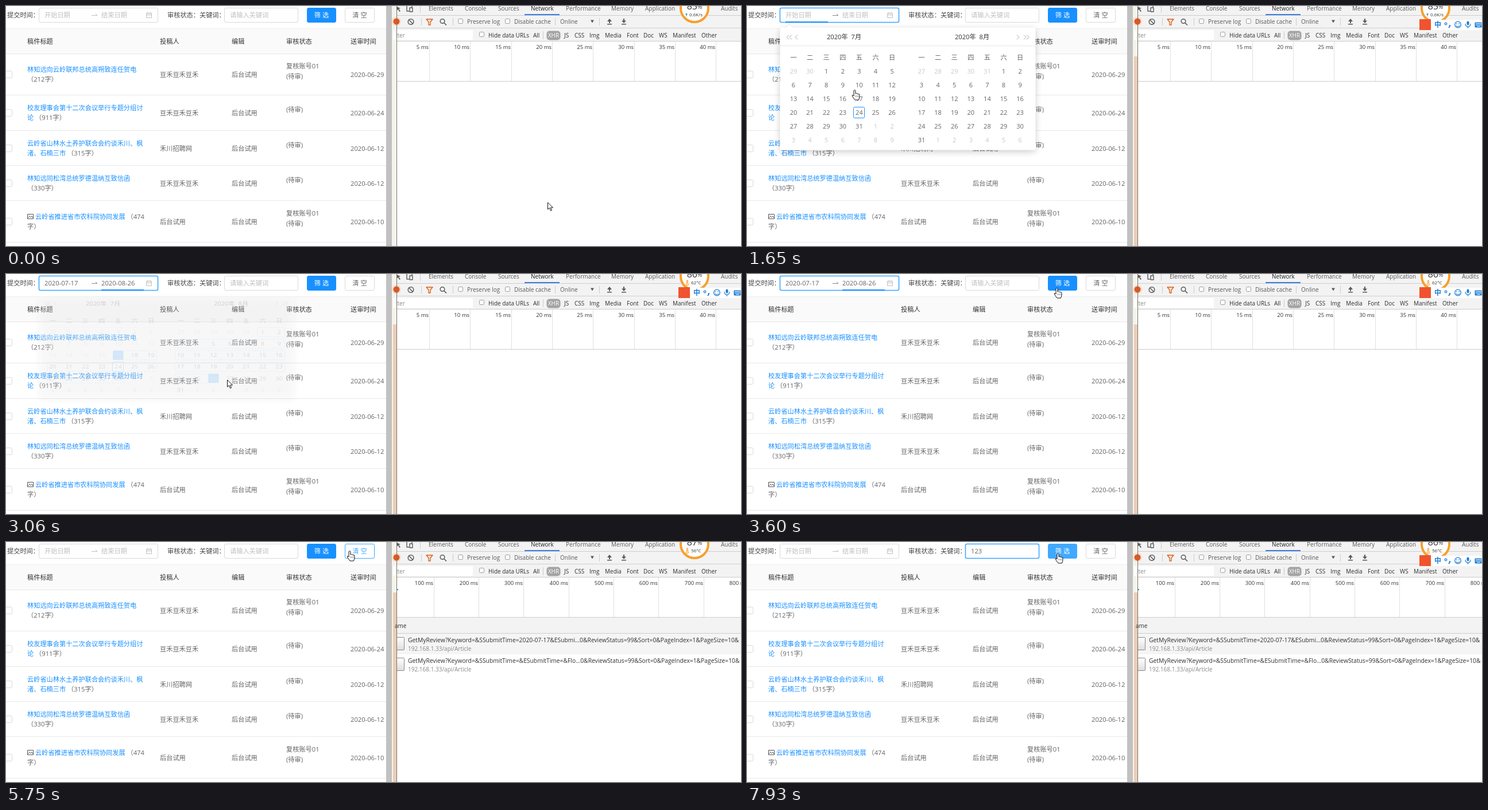
These frames come from a looping animation (1280x419 px, 8000 ms). An HTML page with a canvas:

```html
<!DOCTYPE html>
<html lang="zh-CN">
<head>
<meta charset="utf-8">
<style>
html, body { margin: 0; width: 100%; height: 100%; overflow: hidden; background: #fff; }
canvas { display: block; }
</style>
</head>
<body>
<canvas id="stage" width="1280" height="419"></canvas>
<script>
const c = document.getElementById('stage').getContext('2d');
const FONT = '"Open Sans","Noto Sans CJK SC","Noto Sans CJK JP",sans-serif';
// Sets colons and brackets in the middle of their square
const CENTRED = '"Open Sans","Noto Sans CJK TC","Noto Sans CJK SC",sans-serif';
const BLUE = '#1890ff', LIGHT = '#40a9ff', GREY = '#646464', PALE = '#bfbfbf', DARK = '#303030';
const LOOP = 8000;

// Moments at which the page reacts
const OPEN = 769, PICK = 1970, CLOSE = 2900, SEARCH = 3760, EMPTY = 3900,
      CLEAR = 5580, RELOAD = 5650, FOCUS = 6210;

// Pointer path: time, x, y of the hot spot
const PATH = [
  [0, 943, 343], [70, 943, 343], [680, 120, 16], [870, 120, 16], [948, 143, 37], [1030, 143, 37],
  [1720, 194, 162], [1990, 194, 162], [2095, 347, 197], [2190, 347, 197], [2570, 372, 199],
  [2640, 371, 200], [2720, 364, 207], [2960, 364, 207], [3575, 539, 24], [4750, 539, 24],
  [4820, 496, 13], [4920, 496, 13], [5500, 598, 15], [5780, 598, 15], [6060, 500, 17],
  [6210, 500, 17], [6440, 470, 16], [7380, 470, 16], [7850, 541, 19], [8000, 541, 19]
];

const ROWS = [
  { y: 119, top: 83, title: [['林知远向云岭联邦总统高朔致连任贺电', ''], ['', '（212字）']], author: '豆禾豆禾豆禾', date: '29', by: 1 },
  { y: 186, top: 155, title: [['校友理事会第十二次会议举行专题分组讨', ''], ['论', ' （911字）']], author: '豆禾豆禾豆禾', date: '24' },
  { y: 248, top: 217, title: [['云岭省山林水土养护联合会约谈禾川、枫', ''], ['渚、石楠三市', ' （315字）']], author: '禾川招聘网', date: '12' },
  { y: 309, top: 278, title: [['林知远同松湾总统罗德温纳互致信函', ''], ['', '（330字）']], author: '豆禾豆禾豆禾', date: '12' },
  { y: 376, top: 339, title: [['云岭省推进省市农科院协同发展', ' （474'], ['', '字）']], author: '后台试用', date: '10', by: 1, icon: 1 }
];

const clamp = v => Math.max(0, Math.min(1, v));
const mix = (a, b, k) => a + (b - a) * clamp(k);
const within = (t, a, b) => t >= a && t < b;

// y is the middle of the capitals
function text(s, x, y, color = GREY, size = 11.2, align = 'left', weight = 400, family = FONT) {
  c.font = `${weight} ${size}px ${family}`;
  c.textAlign = align;
  c.textBaseline = 'alphabetic';
  c.fillStyle = color;
  c.fillText(s, x, y + size * .37);
  return c.measureText(s).width;
}
function note(s, x, y, color) { return text(s, x, y, color, 11.2, 'left', 400, CENTRED); }
function rect(x, y, w, h, color) { c.fillStyle = color; c.fillRect(x, y, w, h); }
function box(x, y, w, h, r, fill, stroke, width = 1) {
  c.beginPath();
  c.roundRect(x + .5, y + .5, w - 1, h - 1, r);
  if (fill) { c.fillStyle = fill; c.fill(); }
  if (stroke) { c.strokeStyle = stroke; c.lineWidth = width; c.stroke(); }
}
function icon(d, x, y, stroke, fill, width = 1) {
  const p = new Path2D(d);
  c.save();
  c.translate(x, y);
  if (fill) { c.fillStyle = fill; c.fill(p); }
  if (stroke) { c.strokeStyle = stroke; c.lineWidth = width; c.lineJoin = 'round'; c.stroke(p); }
  c.restore();
}
function disc(x, y, r, fill, stroke, width = 1) {
  c.beginPath();
  c.arc(x, y, r, 0, 7);
  if (fill) { c.fillStyle = fill; c.fill(); }
  if (stroke) { c.strokeStyle = stroke; c.lineWidth = width; c.stroke(); }
}
function field(x, w, focused) {
  if (focused) box(x - 1, 2, w + 2, 28, 3, '#d6ecff');
  box(x, 3, w, 26, 2.5, '#fff', focused ? LIGHT : '#d9d9d9', focused ? 1.5 : 1);
}
function caret(x, t, since) {
  if ((t - since) % 1060 < 530) rect(x, 9, 1, 15, '#333');
}

function pointerAt(t) {
  const q = t < 70 ? 0 : 70 + Math.floor((t - 70) / 78) * 78;
  let i = 1;
  while (i < PATH.length - 1 && PATH[i][0] < q) i++;
  const [ta, xa, ya] = PATH[i - 1], [tb, xb, yb] = PATH[i], k = (q - ta) / (tb - ta);
  return { x: Math.round(mix(xa, xb, k)), y: Math.round(mix(ya, yb, k)) };
}

function drawFilters(t, mouse) {
  note('提交时间：', 2, 16, '#444');
  const dateFocus = within(t, 690, SEARCH);
  const start = within(t, PICK, CLEAR + 40), end = within(t, CLOSE, CLEAR + 40);
  field(57, 208, dateFocus);
  text(start ? '2020-07-17' : '开始日期', 67, 16, start ? GREY : PALE);
  text(end ? '2020-08-26' : '结束日期', 166, 16, end ? GREY : PALE);
  icon('M0 2.5H10M7 0L10 2.5', 149, 14, dateFocus ? '#888' : PALE);
  icon('M.5 1.5H9.5V9.5H.5ZM.5 4.5H9.5M3 0V3M7 0V3', 244, 11, PALE);
  if (within(t, OPEN, SEARCH)) rect(barX(t), 27, 74, 2, BLUE);
  if (within(t, OPEN, PICK)) caret(67, t, OPEN);
  if (within(t, PICK, CLOSE)) caret(166, t, PICK);

  note('审核状态：关键词：', 281, 16, '#444');
  field(380, 129, t >= FOCUS);
  const typed = '123'.slice(0, [6910, 7060, 7210].filter(k => t >= k).length);
  const w = text(typed || '请输入关键词', 390, 16, typed ? GREY : PALE);
  if (t >= FOCUS) caret(typed ? 390 + Math.round(w) : 390, t, t >= 7210 ? 7210 : t >= 6910 ? 6910 : FOCUS);

  const lit = within(t, 3620, CLEAR) || t > 7850;
  box(524, 3, 51, 26, 2.5, lit ? LIGHT : BLUE, lit ? LIGHT : BLUE);
  text('筛 选', 549.5, 16, '#fff', 11.2, 'center', 500);
  const hot = within(t, 5480, 6300) || (mouse.x > 590 && mouse.x < 642 && mouse.y < 30);
  box(590, 3, 52, 26, 2.5, '#fff', hot ? LIGHT : '#d9d9d9');
  text('清 空', 616, 16, hot ? LIGHT : GREY, 11.2, 'center');
}

function drawTable(empty) {
  rect(0, 39, 662, 45, '#fafafa');
  rect(0, 39, 662, 1, '#eee');
  rect(0, 83, 662, 1, '#e8e8e8');
  const cols = empty ? [37, 268, 389, 486, 629] : [37, 268, 393, 488, 600];
  ['稿件标题', '投稿人', '编辑', '审核状态', '送审时间'].forEach((s, i) => text(s, cols[i], 61.5, '#333', 11.2));
  if (empty) {
    rect(0, 216, 662, 203, '#f0f2f5');
    c.beginPath();
    c.ellipse(373.5, 148, 24, 5, 0, 0, 7);
    c.fillStyle = '#f3f3f3';
    c.fill();
    icon('M0 13L8 0H29L37 13V28H0ZM0 13H10C11 13 11 19 14 19H23C26 19 26 13 27 13H37', 355, 122.5, '#d9d9d9', '#fafafa');
    text('暂无数据', 373, 169, '#c4c4c4', 11.2, 'center');
    return;
  }
  for (const r of ROWS) {
    rect(0, r.top, 662, 1, '#e8e8e8');
    box(-2, r.y - 6, 13, 13, 2, '#fff', '#d9d9d9');
    r.title.forEach(([link, count], i) => {
      const y = r.y - 8.5 + i * 17.7;
      let x = 37;
      if (r.icon && !i) {
        icon('M.5 .5H10.5V8.5H.5ZM1 7L4 4L6 6L8 4L10 7M3 2V3', 37, y - 4.5, '#555');
        x = 51;
      }
      if (link) x += text(link, x, y, BLUE);
      note(count, x, y);
    });
    text(r.author, 268, r.y + .5);
    text('后台试用', 393, r.y + .5);
    if (r.by) text('复核账号01', 488, r.y - 14);
    text('(待审)', 488, r.y + (r.by ? 3.5 : -5));
    text('2020-06-' + r.date, 600, r.y + .5);
  }
  rect(0, 412, 662, 1, '#e8e8e8');
}

// Calendar
const MONTHS = [{ x: 81, lead: 2, days: 31, before: 30, first: 0 }, { x: 304, lead: 5, days: 31, before: 31, first: 31 }];
const STEP = 28.6, ROW = 24;

function barX(t) {
  return t < PICK ? mix(166, 67, (t - OPEN) / 300) : mix(67, 166, (t - PICK) / 300);
}
function dayUnder({ x, y }) {
  const m = MONTHS[x < 285 ? 0 : 1];
  const col = Math.round((x - m.x) / STEP), row = Math.round((y - 114) / ROW);
  if (col < 0 || col > 6 || row < 0 || row > 5) return 0;
  const day = row * 7 + col - m.lead + 1;
  return day < 1 || day > m.days ? 0 : m.first + day;
}
function drawCalendar(t, mouse) {
  const p = Math.min(clamp((t - OPEN) / 200), clamp((CLOSE + 200 - t) / 200));
  if (!p) return;
  c.save();
  c.globalAlpha = p;
  c.translate(0, 37 * (1 - (.8 + .2 * p)));
  c.scale(1, .8 + .2 * p);
  c.shadowColor = 'rgba(0,0,0,.2)';
  c.shadowBlur = 12;
  c.shadowOffsetY = 3;
  box(57, 37, 446, 215, 3, '#fff');
  c.shadowColor = 'transparent';
  const notch = barX(t) + 7;
  icon('M-7 7L0 0L7 7', notch, 31, '#e4e4e4', '#fff');
  rect(57, 69, 446, 1, '#e8e8e8');
  text('2020年  7月', 169, 54, '#333', 11.2, 'center', 500);
  text('2020年  8月', 392, 54, '#333', 11.2, 'center', 500);
  icon('M4 0L0 4L4 8M9 0L5 4L9 8M19 0L15 4L19 8', 69, 50.5, '#aaa');
  icon('M0 0L4 4L0 8M12 0L16 4L12 8M17 0L21 4L17 8', 470, 50.5, '#aaa');

  const picking = t >= PICK;
  const last = picking ? (t >= CLOSE ? 57 : dayUnder(mouse)) : 0;
  for (const m of MONTHS) {
    [...'一二三四五六日'].forEach((s, i) => text(s, m.x + i * STEP, 89.5, GREY, 11.2, 'center'));
    for (let row = 0; row < 6; row++) {
      const y = 114 + row * ROW, hits = [];
      if (picking && !m.first && row < 3) rect(67, y - 10, row < 2 ? 201 : 114, 20, '#f5f5f5');
      for (let col = 0; col < 7; col++) {
        const d = row * 7 + col - m.lead + 1, n = m.first + d;
        if (d > 0 && d <= m.days && n >= 17 && n <= last) hits.push(m.x + col * STEP);
      }
      if (hits.length) {
        c.setLineDash([3, 2]);
        box(Math.round(hits[0] - 9.6), y - 10, Math.round(hits[hits.length - 1] - hits[0] + 20), 20, 2, '', '#7fc4ff');
        c.setLineDash([]);
      }
      for (let col = 0; col < 7; col++) {
        const d = row * 7 + col - m.lead + 1, x = m.x + col * STEP, n = m.first + d;
        const other = d < 1 || d > m.days;
        const chosen = !other && picking && (n === 17 || (t >= CLOSE && n === 57));
        if (chosen) box(x - 9.5, y - 10, 19, 20, 2, LIGHT);
        if (n === 24 && !m.first) box(Math.round(x - 10), y - 10, 20, 20, 2, '#fff', BLUE);
        const day = d < 1 ? m.before + d : d > m.days ? d - m.days : d;
        const off = other || (picking && n < 17);
        text(day, x, y, chosen ? '#fff' : off ? '#c8c8c8' : GREY, 11, 'center');
      }
    }
  }
  c.restore();
}

function check(x, y) { box(x, y, 9, 9, 2, '#fff', '#999'); }
function label(s, x, y, color = '#5a5a5a', size = 10) { return text(s, x, y, color, size); }

function drawDevtools(t) {
  const loaded = t >= EMPTY, reloaded = t >= RELOAD;
  rect(662, 0, 10, 419, '#c1c1c1');
  rect(672, 0, 8, 419, '#f5f4ec');
  if (t >= 700) rect(674, 88, 6, 331, '#ebcdb5');
  rect(681, 0, 599, 61, '#f3f3f3');
  rect(681, 61, 599, 358, '#fff');
  rect(681, 16, 599, 1, '#ccc');
  rect(681, 38, 599, 1, '#d0d0d0');
  rect(681, 61, 599, 1, '#ccc');

  // Tabs
  [['Elements', 736], ['Console', 799], ['Sources', 857], ['Network', 914], ['Performance', 975],
   ['Memory', 1054], ['Application', 1113], ['Audits', 1245]]
    .forEach(([s, x]) => label(s, x, 4, s === 'Network' ? '#222' : '#5a5a5a'));
  rect(903, 14, 61, 2, '#3b7fe0');
  icon('M0 0L7 3L4 4L7 8L5 9L3 5L0 7Z', 680, 1, '', '#5a5a5a');
  icon('M0 -4V9H4M2 -4H9V2M5 3H10V10H5Z', 698, 0, '#5a5a5a', '', 1.4);
  rect(721, 0, 1, 12, '#ccc');

  // Toolbar
  disc(680, 27, 8, '#f8dfd0');
  disc(680, 27, 5.5, '#e2571e');
  disc(705, 27.5, 4.8, '', '#5a5a5a', 1.5);
  icon('M0 0L7 7', 701.5, 24, '#5a5a5a', '', 1.5);
  icon('M0 0H11L7 5V10H4V5Z', 732, 23, '#d9601c', '#fbe3d3', 1.3);
  disc(760, 26.5, 3.8, '', '#5a5a5a', 1.5);
  icon('M0 0L4 4', 763, 29.5, '#5a5a5a', '', 1.7);
  [723, 778, 956, 1033].forEach(x => rect(x, 21, 1, 13, '#ccc'));
  check(787, 22);
  label('Preserve log', 803, 27.5);
  check(869, 22);
  label('Disable cache', 885, 27.5);
  label('Online', 965, 27.5);
  icon('M0 0H6L3 5Z', 1018, 24.5, '', '#5a5a5a');
  icon('M5 0L9 5H6V8H4V5H1ZM1 9H9V10.5H1Z', 1046, 22, '', '#5a5a5a');
  icon('M5 8L9 3.5H6V0H4V3.5H1ZM1 9H9V10.5H1Z', 1071, 22, '', '#5a5a5a');

  // Filter row
  rect(674, 42, 139, 17, '#fff');
  label('lter', 679, 51, '#888');
  check(824, 45);
  label('Hide data URLs', 840, 51, DARK);
  rect(935, 44, 1, 14, '#ccc');
  box(941, 43, 25, 17, 5, '#a3a3a3');
  text('XHR', 953.5, 51.5, '#fff', 10, 'center');
  [['All', 918], ['JS', 972], ['CSS', 990], ['Img', 1016], ['Media', 1043], ['Font', 1081], ['Doc', 1110],
   ['WS', 1137], ['Manifest', 1161], ['Other', 1211]].forEach(([s, x]) => label(s, x, 51, DARK));

  // Time ruler
  const gap = reloaded ? 78.35 : 71.3, from = reloaded ? 744.5 : 737;
  for (let i = 0; i < 8; i++) {
    const x = Math.round(from + i * gap);
    rect(x, 62, 1, 69, '#e0e0e0');
    text((i + 1) * (reloaded ? 100 : 5) + ' ms', x - 1, 71.5, DARK, 9.5, 'right');
  }
  rect(681, 131, 599, 1, '#ccc');
  if (reloaded) rect(681, 82, 2, 2, '#2f9be0');
  else if (loaded) {
    rect(681, 82, 7, 2, '#ddd');
    rect(688, 82, 19, 2, '#a58d80');
    rect(707, 82, 225, 2, '#1fb85c');
    rect(932, 82, 7, 2, '#2f9bf0');
  }

  // Requests
  if (loaded) {
    rect(681, 132, 599, 27, '#f3f3f3');
    rect(681, 159, 599, 1, '#ccc');
    label('ame', 677, 146, DARK);
    request(160, 'SSubmitTime=2020-07-17&ESubmi…0', '#f5f5f5');
  }
  if (reloaded) request(196, 'SSubmitTime=&ESubmitTime=&Flo…0', '#fff');
  rect(680, 0, 1, 419, '#77736a');
}
function request(y, query, bg) {
  rect(681, y, 599, 36, bg);
  c.save();
  c.beginPath();
  c.rect(680, y, 600, 36);
  c.clip();
  const g = c.createLinearGradient(0, y + 6, 0, y + 29);
  g.addColorStop(0, '#fff');
  g.addColorStop(1, '#ddd');
  box(676, y + 6, 18, 23, 1, g, '#888');
  c.restore();
  label(`GetMyReview?Keyword=&${query}&ReviewStatus=99&Sort=0&PageIndex=1&PageSize=10&`, 700, y + 11, DARK, 10.3);
  label('192.168.1.33/api/Article', 700, y + 26, '#888');
}

function drawGauge(t) {
  disc(1199, 4, 24, '#fff', '#f6a02d', 4);
  const load = t < 1800 ? 85 : t < 4440 ? 86 : t < 7400 ? 87 : 86;
  text(load, 1204, 0, '#333', 16, 'right');
  text('%', 1204, 1.5, '#333', 10);
  const heat = t < 4440 ? 62 : t < 5580 ? 58 : 56;
  if (t < 2600) {
    icon('M2 0L4 3H2.6V6H1.4V3H0Z', 1183, 12, '', '#2a9bb8');
    text(t < 1800 ? '0.6K/s' : '0.04K/s', 1213, 15, '#333', 8, 'right');
  } else {
    icon('M1.5 0H3.5V5A2.2 2.2 0 1 1 1.5 5Z', 1184, 11, '#f6a02d', '#fde0b4');
    text(heat + '°C', 1193, 15, '#333', 8);
  }
}

function drawInputBar() {
  const ink = '#1c7fd6';
  rect(1190, 24, 90, 18, '#fff');
  rect(1171, 23, 20, 19, '#f0532d');
  text('中', 1203, 33, ink, 12, 'center', 700);
  disc(1217, 31, 1.8, '', ink, 1.3);
  icon('M2 0V2L0 5', 1222, 33, ink, '', 2);
  disc(1238, 32.5, 5.3, '', ink, 1.3);
  icon('M0 0Q3 4 6 0M1 -4V-2M5 -4V-2', 1235, 34, ink, '', 1.2);
  box(1253, 26, 5, 8, 2.5, ink);
  icon('M0 0Q0 5 4.5 5Q9 5 9 0M4.5 5V8', 1251, 31, ink, '', 1.2);
  box(1267, 28, 13, 10, 1, ink);
  icon('M2 2.5H12M2 5H12M4 7.5H10', 1267, 28, '#fff', '', 1);
}

function drawPointer({ x, y }, t) {
  const calendar = within(t, OPEN, CLOSE + 150) && x > 57 && x < 503 && y >= 36 && y < 252;
  const row = y > 2 && y < 30, inX = (a, b) => x > a && x < b;
  if (calendar || (row && (inX(523, 575) || inX(590, 642)))) {
    icon('M3 11V1.5Q4.5 -.5 6 1.5V7Q7.5 5.5 8.5 7.3Q10 6.2 11 8Q13 7 13 9.5V13L11.5 18H5L1 12.5Q-1 9.5 1 9.5Z',
      x - 4, y, '#111', '#fff');
    icon('M0 0V3M2.5 0V3M5 0V3', x + 2, y + 10, '#555', '', .7);
  } else if (row && (inX(57, 264) || inX(380, 508))) {
    icon('M0 0H2L3 1L4 0H6M3 1V12M0 13H2L3 12L4 13H6', x - 3, y - 6, '#222', '', 1.2);
  } else {
    icon('M0 0V12L3 9.5L5 14.5L7 13.5L5 9H9Z', x + .5, y, '#111', '#fff');
  }
}

function draw(t) {
  const mouse = pointerAt(t);
  rect(0, 0, 1280, 419, '#fff');
  drawTable(within(t, EMPTY, RELOAD));
  drawFilters(t, mouse);
  drawCalendar(t, mouse);
  drawDevtools(t);
  drawGauge(t);
  if (within(t, OPEN, SEARCH) || t >= FOCUS) drawInputBar();
  drawPointer(mouse, t);
}
function frame() {
  draw(performance.now() % LOOP);
  requestAnimationFrame(frame);
}
frame();
</script>
</body>
</html>
```
